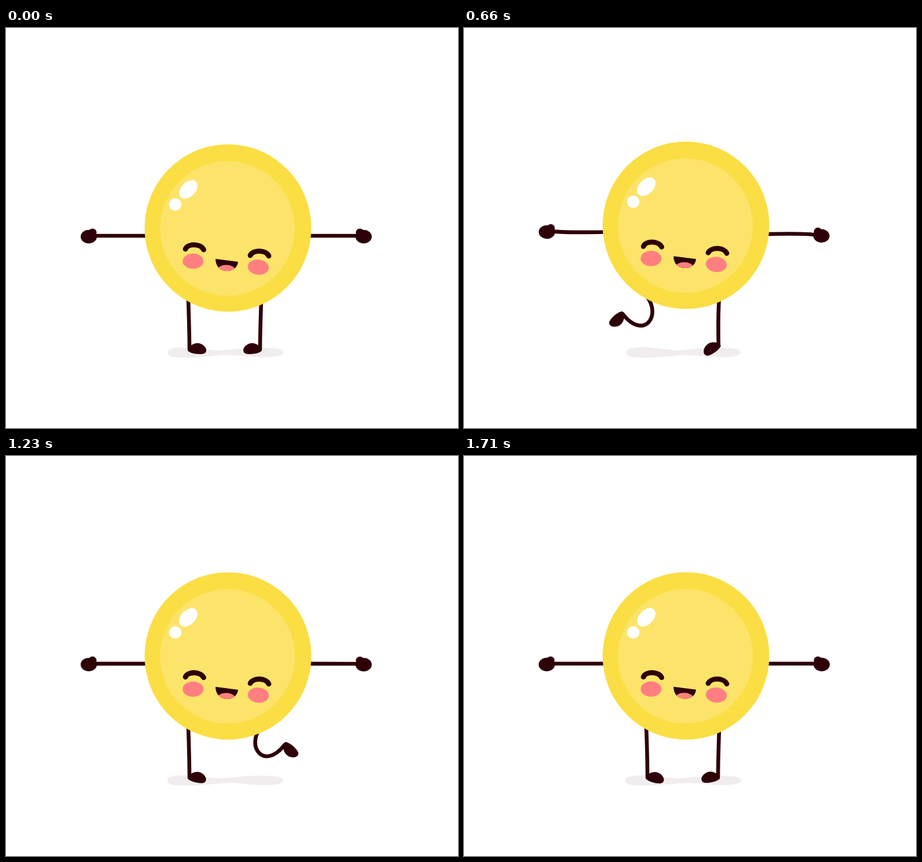
An HTML page for the animation above (1740 ms loop, 781 by 693 pixels).

```html
<!DOCTYPE html>
<html lang="en">
<head>
<meta charset="utf-8">
<title>Jumping coin</title>
<style>
html, body { margin: 0; width: 100%; height: 100%; overflow: hidden; background: #fff; }
svg { display: block; }
.dark { fill: #2e0108; }
.line { fill: none; stroke: #2e0108; stroke-width: 6.6; stroke-linecap: round; }
.pink { fill: #ff7f80; }
</style>
</head>
<body>
<svg width="781" height="693" viewBox="0 0 781 693">
  <defs>
    <clipPath id="lips"><path d="M362 400L401 405C400 415 392 421 381 421C369 420 362 412 362 400Z"/></clipPath>
  </defs>
  <path id="shadow" fill="#f1edef" d="M-100 0C-100-10-70-10-45-7S-12-3 0-4S45-9 70-8S100-5 100 1S75 10 50 7.5S12 4 0 4.5S-40 9-65 9S-100 8-100 0Z"/>
  <g id="hero">
    <g id="legs"></g>
    <g id="arms"></g>
    <ellipse cx="383.5" cy="346.5" rx="144" ry="145" fill="#fade43"/>
    <circle cx="382.6" cy="347.3" r="116.5" fill="#fce46a"/>
    <ellipse cx="315" cy="279.7" rx="19" ry="12.3" transform="rotate(-46 315 279.7)" fill="#fff"/>
    <circle cx="292.5" cy="305.8" r="10.7" fill="#fff"/>
    <g class="line" style="stroke-width:8.8">
      <path d="M310 383C314 373 336 373 341.500 384"/>
      <path d="M422 394C427 384 449 384 454 395"/>
    </g>
    <ellipse class="pink" cx="323.2" cy="404" rx="18" ry="13.2"/>
    <ellipse class="pink" cx="436" cy="414.4" rx="18.2" ry="13.2" transform="rotate(6 436 414.4)"/>
    <g clip-path="url(#lips)">
      <rect class="dark" x="355" y="395" width="50" height="30"/>
      <ellipse class="pink" cx="380.500" cy="419" rx="15" ry="8.500"/>
    </g>
  </g>
</svg>
<script>
const LOOP = 1740, STEP = 30, HEIGHT = 72, MID = 346;
// rest, peak, rest, peak ... in ms
const JUMPS = [0, 297, 609, 919, 1238, 1488, 1718];
const SWINGS = [0, 300, 625, 900, 1235];
const $ = id => document.getElementById(id);
const mix = (a, b, k) => a + (b - a) * k;

const FOOT = '<path class="dark" d="M-3 3C-2-4 6-10 14-10C22-10 29-3 29 2C29 8 24 9 18 9C8 9-1 6-3 3Z"/>';
const HAND = '<ellipse class="dark" cx="13" cy="1.500" rx="14" ry="11.700"/><circle class="dark" cx="6.500" cy="-5.500" r="7"/>';

// A limb is a curve with a hand or foot at its end; mirrored ones flip around axis / 2.
function limb(parent, tip, axis) {
  const flip = axis ? ` transform="matrix(-1 0 0 1 ${axis} 0)"` : '';
  parent.insertAdjacentHTML('beforeend', `<g${flip}><path class="line"/><g>${tip}</g></g>`);
  const [curve, end] = parent.lastChild.children;
  return (p, angle) => {
    const q = p.map(([x, y]) => [x, y + MID]);
    curve.setAttribute('d', `M${q[0]}C${q.slice(1).join(' ')}`);
    end.setAttribute('transform', `translate(${q[3]}) rotate(${angle})`);
  };
}

const legs = $('legs'), arms = $('arms');
const leftLeg = limb(legs, FOOT), rightLeg = limb(legs, FOOT, 756);
const rightArm = limb(arms, HAND), leftArm = limb(arms, HAND, 761);

// lift: 1 raised, 0 level, -1 lowered
function poseArm(arm, lift) {
  const up = Math.max(lift, 0), down = Math.max(-lift, 0);
  arm([
    [518 - 9 * down, 14 - 44 * up + 46 * down],
    [552 - 12 * down, 14 - 29 * up + 26 * down],
    [590 - 10 * down, 14 - 34 * up + 26 * down],
    [605 - 5 * up - 8 * down, 14 - 66 * up + 68 * down]
  ], -62 * up + 57 * down);
}

// curl: 0 standing, 1 folded back
function poseLeg(leg, curl) {
  leg([
    [mix(315, 316, curl), 124],
    [mix(316, 342, curl), mix(155, 158, curl)],
    [mix(317, 310, curl), mix(185, 200, curl)],
    [mix(317, 274, curl ** 1.3), mix(210, 154, curl)]
  ], 132 * Math.sqrt(curl));
}

// Eased 0..1 wave through the given rest and peak times
function wave(keys, t) {
  const i = keys.findIndex(k => k > t);
  if (i < 0) return 0;
  const k = (t - keys[i - 1]) / (keys[i] - keys[i - 1]);
  const eased = (1 - Math.cos(Math.PI * k)) / 2;
  return i % 2 ? eased : 1 - eased;
}

function draw(t) {
  const h = wave(JUMPS, t);
  const lift = 1.03 * wave(SWINGS, t) * (t < SWINGS[2] ? 1 : -1);
  $('hero').setAttribute('transform', `translate(0 ${-HEIGHT * h})`);
  $('shadow').setAttribute('transform', `translate(379 562) scale(${1 - 0.195 * h} 1)`);
  poseArm(rightArm, lift);
  poseArm(leftArm, -lift);
  // first landing is on the right leg, the second on the left
  poseLeg(leftLeg, t > JUMPS[1] && t < JUMPS[3] ? 1 : Math.min(1, 1.24 * h));
  poseLeg(rightLeg, t > JUMPS[3] && t < JUMPS[5] ? 1 : h ** 1.15);
}

const start = performance.now();
function tick() {
  const t = (performance.now() - start) % LOOP;
  draw(Math.floor(t / STEP) * STEP);
  requestAnimationFrame(tick);
}
tick();
</script>
</body>
</html>
```
